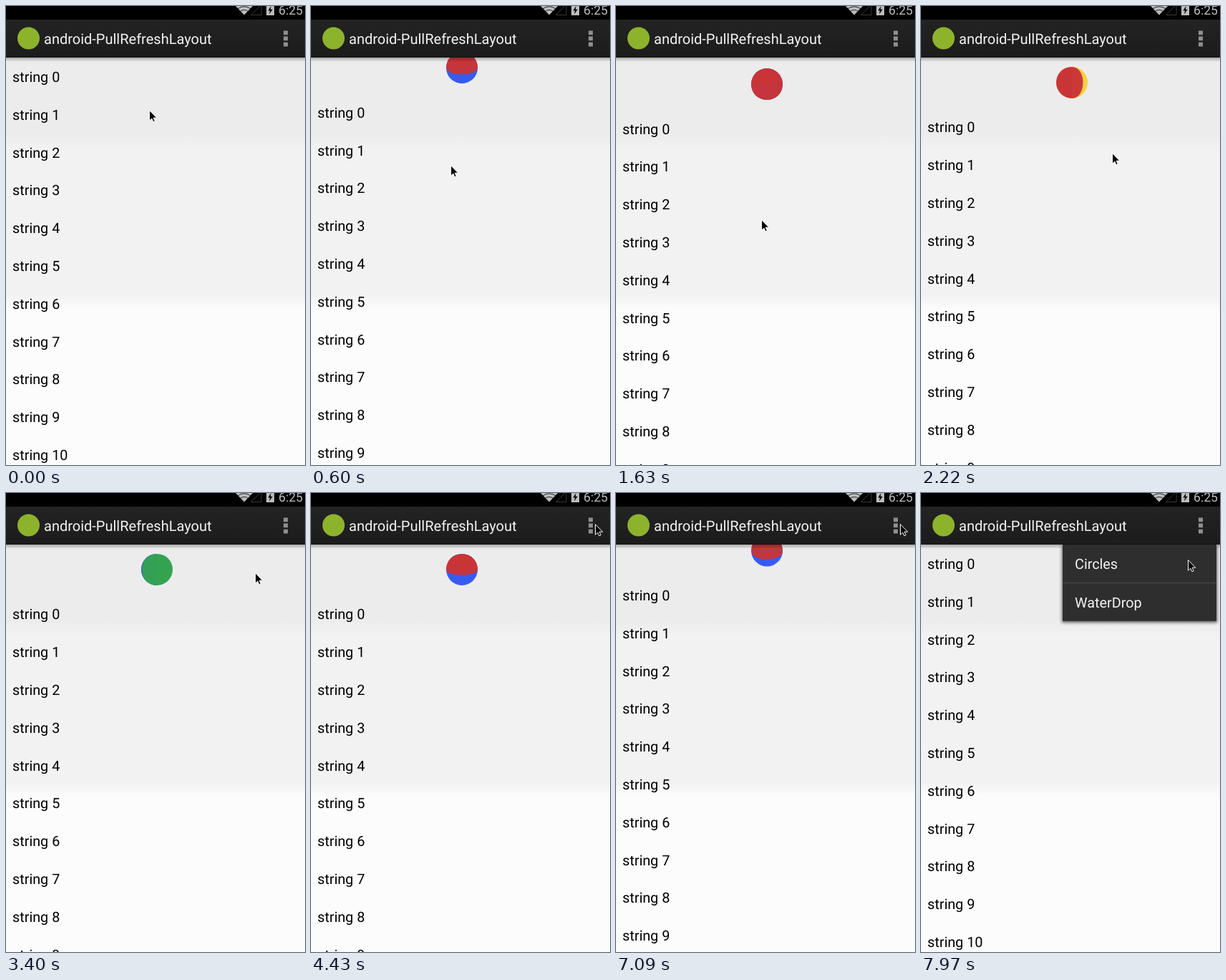
An HTML page for the animation above (8 s loop, 418 by 641 pixels).

```html
<!DOCTYPE html>
<html lang="en">
<head>
<meta charset="utf-8">
<title>Pull to refresh</title>
<style>
  html, body { margin: 0; width: 100%; height: 100%; overflow: hidden; background: #fcfcfc; }
  svg { display: block; width: 100%; height: 100%; }
  text { font: 19.8px Roboto, sans-serif; text-rendering: geometricPrecision; }
</style>
</head>
<body>
<svg viewBox="0 0 418 641">
  <defs>
    <linearGradient id="page" gradientUnits="userSpaceOnUse" x1="0" y1="0" x2="0" y2="641">
      <stop offset=".278" stop-color="#ececec"/>
      <stop offset=".312" stop-color="#f2f2f2"/>
      <stop offset=".629" stop-color="#f2f2f2"/>
      <stop offset=".661" stop-color="#fcfcfc"/>
    </linearGradient>
    <linearGradient id="bar" x2="0" y2="1">
      <stop stop-color="#232323"/>
      <stop offset="1" stop-color="#1c1c1c"/>
    </linearGradient>
    <linearGradient id="shade" x2="0" y2="1">
      <stop stop-opacity=".28"/>
      <stop offset="1" stop-opacity="0"/>
    </linearGradient>
    <clipPath id="content"><rect y="72" width="418" height="569"/></clipPath>
    <filter id="blur" x="-10%" y="-10%" width="120%" height="125%"><feGaussianBlur stdDeviation="2.2"/></filter>
  </defs>

  <rect width="418" height="641" fill="url(#page)"/>
  <g clip-path="url(#content)">
    <g id="pulled">
      <g transform="translate(211 36.5)">
        <circle id="second" r="22"/>
        <path id="first"/>
        <path id="flap" fill-opacity=".97"/>
      </g>
      <g id="list"></g>
    </g>
  </g>
  <rect y="72" width="418" height="6" fill="url(#shade)"/>

  <rect width="418" height="19"/>
  <g fill="#bdbdbd">
    <path d="M321 0H345L333 12.5Z"/>
    <path d="M323 4.5Q333 -3 343 4.5M326.5 8Q333 3 339.5 8" fill="none" stroke="#000" stroke-width=".8"/>
    <path d="M342.5 12.5H357V-2Z" fill="none" stroke="#3a3a3a"/>
    <rect x="364" y="-2" width="11" height="15"/>
    <path d="M370.5 0L366.3 6.5H369L368 11.5L372.7 4.8H369.8Z" fill="#000"/>
    <text x="381" y="12" style="font-size:17.6px">6:25</text>
  </g>

  <rect y="19" width="418" height="53" fill="url(#bar)"/>
  <rect y="71" width="418" height="1" fill="#111"/>
  <circle cx="31.5" cy="45" r="15.5" fill="#8db32c"/>
  <text x="53" y="53" fill="#f3f3f3" style="font-size:20px">android-PullRefreshLayout</text>
  <path d="M391 34.5v5.7M391 42.6v5.7M391 50.8v5.7" stroke="#8f8f8f" stroke-width="6"/>

  <g id="menu">
    <rect x="197" y="73" width="217" height="108" fill-opacity=".6" filter="url(#blur)" clip-path="url(#content)"/>
    <rect x="198" y="72" width="215" height="107" rx="1" fill="#2e2e2e"/>
    <rect x="198" y="125" width="215" height="1" fill="#4a4a4a"/>
    <rect x="198" y="178" width="215" height="1" fill="#3c3c3c"/>
    <text x="215" y="106" fill="#f3f3f3">Circles</text>
    <text x="215" y="160" fill="#f3f3f3">WaterDrop</text>
  </g>

  <path id="cursor" d="M.5 .7V15.2L3.8 12.1L5.9 16.8L8.2 15.8L6.2 11.2H10.7Z" stroke="#fff" stroke-width="1"/>
</svg>
<script>
const $ = id => document.getElementById(id);
const LOOP = 8000, TICK = 147.55;
const REST = 70.4, R = 22, QUARTER = 2500;
const RELEASE = 1420, SPIN = 2120, DONE = 7005, SETTLE = 700;
const RED = '#c93437', BLUE = '#375bf1', YELLOW = '#f7d23e', GREEN = '#34a350';

// Each fold: axis, colour of the top/left half, colour of the other half, direction
const FOLDS = [
  { axis: 'y', first: RED, second: BLUE, back: false },
  { axis: 'x', first: RED, second: YELLOW, back: true },
  { axis: 'y', first: YELLOW, second: GREEN, back: true },
  { axis: 'x', first: BLUE, second: GREEN, back: false }
];
const HALF = { x: `M0 ${-R}A${R} ${R} 0 0 0 0 ${R}Z`, y: `M${-R} 0A${R} ${R} 0 0 1 ${R} 0Z` };

// Pointer: time, x, y
const POINTER = [
  [0, 200, 145], [150, 200, 147], [440, 197, 190], [740, 193, 253], [1040, 190, 307],
  [1190, 190, 315], [1420, 190, 315], [1620, 203, 298], [2220, 268, 204], [2360, 274, 196],
  [2900, 312, 158], [3550, 360, 96], [4280, 397, 43], [7560, 397, 43], [7900, 373, 93], [8000, 373, 93]
];

for (let i = 0; i < 11; i++) {
  const row = document.createElementNS('http://www.w3.org/2000/svg', 'text');
  row.setAttribute('x', 9);
  row.setAttribute('y', 106 + i * 52.8);
  row.textContent = 'string ' + i;
  $('list').append(row);
}

const clamp = v => Math.max(0, Math.min(1, v));
const decelerate = v => 1 - (1 - clamp(v)) ** 4;

function pointerAt(t) {
  const i = POINTER.findIndex(p => p[0] > t);
  const [t0, x0, y0] = POINTER[i - 1], [t1, x1, y1] = POINTER[i];
  const k = (t - t0) / (t1 - t0);
  return [x0 + (x1 - x0) * k, y0 + (y1 - y0) * k];
}

const dragAt = t => (pointerAt(Math.min(t, RELEASE))[1] - 145) * 0.65;

function stretch(drag) {
  if (drag <= REST) return drag;
  const pull = (drag - REST) / REST / 4;
  return REST + REST * (pull - pull * pull);
}

function offsetAt(t) {
  if (t < RELEASE) return stretch(dragAt(t));
  if (t < DONE) {
    const top = stretch(dragAt(RELEASE));
    return top + (REST - top) * decelerate((t - RELEASE) / SETTLE);
  }
  return REST * (1 - decelerate((t - DONE) / SETTLE));
}

function levelAt(t) {
  if (t < SPIN) return (QUARTER - 1) * clamp(dragAt(t) / REST);
  return (QUARTER + (Math.min(t, DONE) - SPIN) * 3.98) % (QUARTER * 4);
}

function drawDisc(level) {
  const { axis, first, second, back } = FOLDS[Math.floor(level / QUARTER)];
  const part = level % QUARTER / QUARTER;
  const turn = back ? 1 - part : part;
  const bend = (turn - 0.5) * R * 8 / 3;
  $('second').setAttribute('fill', second);
  $('first').setAttribute('fill', first);
  $('first').setAttribute('d', HALF[axis]);
  $('flap').setAttribute('fill', turn < 0.5 ? second : first);
  $('flap').setAttribute('d', axis === 'x'
    ? `M0 ${-R}C${bend} ${-R} ${bend} ${R} 0 ${R}`
    : `M${-R} 0C${-R} ${bend} ${R} ${bend} ${R} 0`);
}

function draw(now) {
  const t = Math.floor(now % LOOP / TICK) * TICK;
  const [x, y] = pointerAt(t);
  $('pulled').setAttribute('transform', `translate(0 ${offsetAt(t).toFixed(2)})`);
  $('cursor').setAttribute('transform', `translate(${Math.round(x)} ${Math.round(y)})`);
  $('menu').setAttribute('opacity', clamp((t - 7500) / 160));
  drawDisc(levelAt(t));
}

const start = performance.now();
function frame() {
  draw(performance.now() - start);
  requestAnimationFrame(frame);
}
frame();
</script>
</body>
</html>
```
